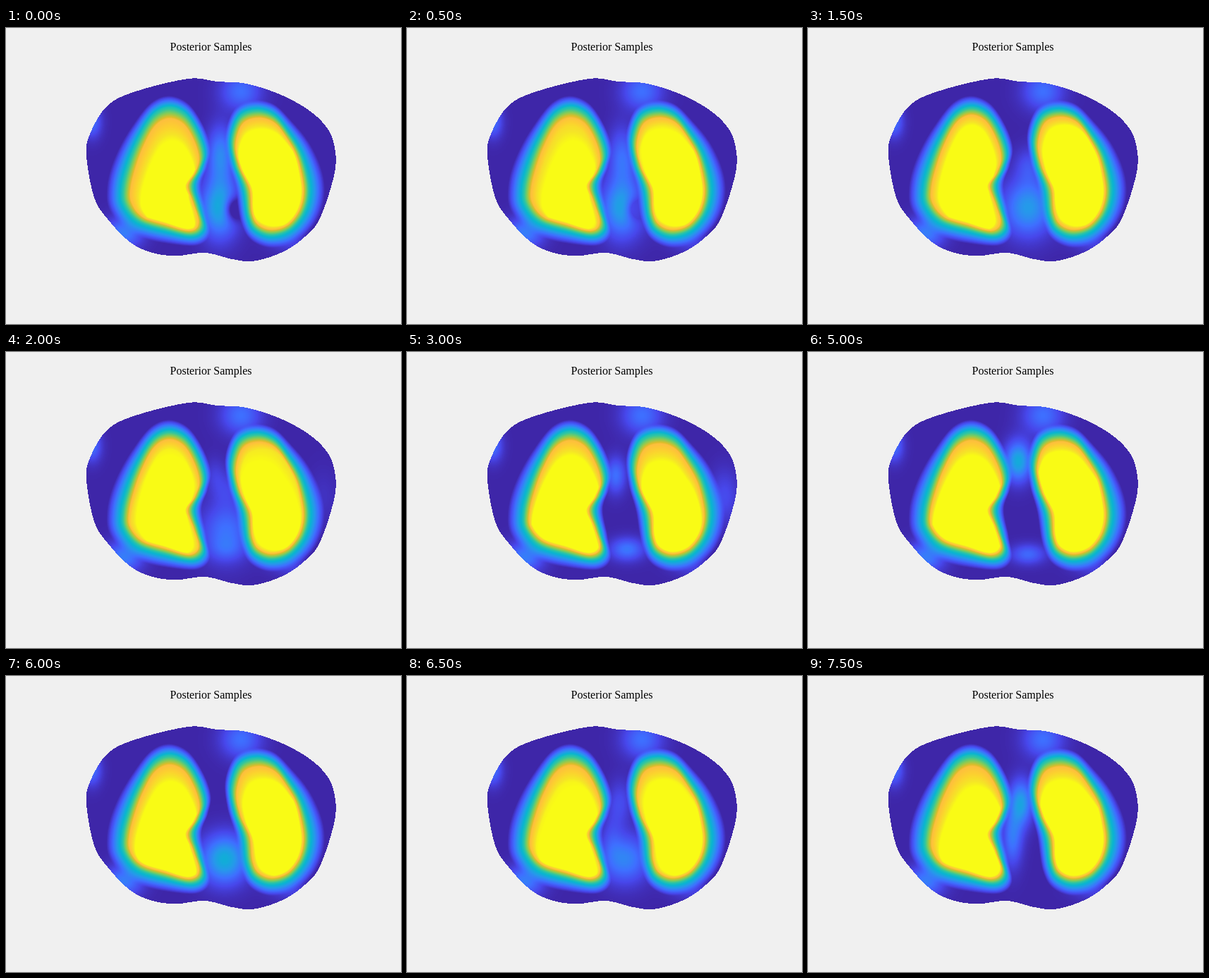
Write an HTML page with a canvas that moves like this. It is 560 px wide and 420 px high and loops after 8000 ms.

```html
<!DOCTYPE html>
<html lang="en">
<head>
<meta charset="utf-8">
<title>Posterior Samples</title>
<style>
  html, body { margin: 0; width: 100%; height: 100%; overflow: hidden; background: #f0f0f0; }
  canvas { position: absolute; left: 0; top: 0; }
  div { position: absolute; left: 21px; right: 0; top: 18px; text-align: center;
        font: 16px/18px "Liberation Serif", serif; color: #000; white-space: nowrap; }
</style>
</head>
<body>
<canvas id="stage" width="560" height="420"></canvas>
<div>Posterior Samples</div>
<script>
const LOOP = 8000, STEP = 500, BINS = 720;
const BOX = { x: 110, y: 68, w: 360, h: 268 };
const ctx = document.getElementById('stage').getContext('2d');
const clamp = (v, lo, hi) => Math.max(lo, Math.min(hi, v));
const mix = (a, b, t) => a + (b - a) * t;

// Colour scale: position, red, green, blue.
const stops = [
  [0, 62, 38, 168], [0.11, 71, 71, 235], [0.22, 62, 111, 255], [0.33, 39, 151, 235],
  [0.44, 8, 181, 208], [0.56, 49, 198, 159], [0.67, 129, 204, 89], [0.78, 220, 189, 41],
  [0.83, 253, 190, 61], [0.89, 252, 207, 48], [0.95, 245, 228, 39], [1, 249, 251, 21]
];

function colour(v) {
  const i = Math.max(1, stops.findIndex(s => s[0] >= v));
  const [a, b] = [stops[i - 1], stops[i]];
  const t = (v - a[0]) / (b[0] - a[0]);
  return [1, 2, 3].map(k => mix(a[k], b[k], t));
}
const shades = Array.from({ length: 257 }, (_, i) => colour(i / 256));

const binOf = (dx, dy) => (Math.atan2(dy, dx) / (2 * Math.PI) + 1) % 1 * BINS;

// Smooth closed curve through points, stored as radius per angle around a centre.
function polar([cx, cy], pts) {
  const n = pts.length, table = new Float32Array(BINS + 1);
  const spline = (i, t, k) => {
    const [a, b, c, d] = [-1, 0, 1, 2].map(o => pts[(i + o + n) % n][k]);
    return b + t / 2 * (c - a + t * (2 * a - 5 * b + 4 * c - d + t * (3 * (b - c) + d - a)));
  };
  for (let i = 0; i < n; i++) {
    for (let t = 0; t < 1; t += 0.005) {
      const dx = spline(i, t, 0) - cx, dy = spline(i, t, 1) - cy;
      table[Math.round(binOf(dx, dy)) % BINS] = Math.hypot(dx, dy);
    }
  }
  for (let i = 1; i < BINS; i++) table[i] = table[i] || table[i - 1];
  table[BINS] = table[0];
  return table;
}

function radius(table, bin) {
  const i = Math.floor(bin) % BINS;
  return mix(table[i], table[i + 1], bin - Math.floor(bin));
}

const middle = [290, 200];
const chest = polar(middle, [
  [258, 72], [300, 76], [340, 79], [385, 93], [425, 114], [452, 138], [465, 165], [466, 205],
  [445, 270], [422, 298], [390, 319], [350, 331], [320, 328], [282, 319], [240, 323],
  [205, 318], [175, 303], [145, 272], [125, 240], [114, 180], [120, 148], [143, 111], [180, 91]
]);

function organ(centre, side, rim) {
  const xs = rim.map(p => p[0]), ys = rim.map(p => p[1]);
  const x0 = Math.min(...xs), y0 = Math.min(...ys);
  const w = Math.max(...xs) - x0, h = Math.max(...ys) - y0;
  const fit = ([l, t, r, b]) =>
    rim.map(([x, y]) => [l + (x - x0) / w * (r - l), t + (y - y0) / h * (b - t)]);
  return { centre, side, edge: polar(centre, rim), core: box => polar(centre, fit(box)) };
}

const left = organ([228, 225], -1, [
  [230, 112], [207, 124], [187, 157], [173, 192], [165, 225], [167, 251], [188, 275], [228, 288],
  [264, 295], [280, 283], [274, 255], [266, 224], [276, 200], [281, 177], [272, 148], [254, 121]
]);
const right = organ([383, 225], 1, [
  [354, 116], [330, 126], [319, 158], [324, 193], [337, 228], [343, 267], [354, 287],
  [377, 295], [404, 286], [424, 260], [430, 225], [419, 180], [399, 146], [379, 123]
]);

// Saturated core, orange shoulder, teal edge, then a fade to nothing.
function level({ centre, side, edge }, core, x, y) {
  const dx = x - centre[0], dy = y - centre[1], r = Math.hypot(dx, dy);
  const bin = binOf(dx, dy), rim = radius(edge, bin);
  const full = Math.min(radius(core, bin), rim - 12);
  const shoulder = rim - 6 - 0.22 * (rim - full);
  const fade = 17 + (5 * side * dx + dy) / r;
  if (r <= full) return 1;
  if (r <= shoulder) return mix(1, 0.83, (r - full) / (shoulder - full));
  if (r <= rim) return mix(0.83, 0.5, (r - shoulder) / (rim - shoulder));
  return Math.max(0, 0.5 * (1 - (r - rim) / fade));
}

// Soft spots: x, y, x radius, y radius, strength.
const common = [
  [168, 290, 26, 22, 0.26], [122, 133, 13, 22, 0.22], [402, 304, 28, 13, 0.1], [333, 90, 28, 26, 0.22]
];

// Cores are boxes (left, top, right, bottom) that the lung outline is fitted into.
const samples = [
  { slot: 0, left: [192, 160, 268, 287], right: [330, 144, 427, 281],
    spots: [[304, 180, 18, 40, 0.28], [303, 255, 26, 42, 0.4], [323, 257, 13, 16, -0.33]] },
  { slot: 3, left: [186, 138, 266, 285], right: [333, 138, 426, 281],
    spots: [[312, 255, 34, 40, 0.34], [312, 195, 18, 25, 0.12]] },
  { slot: 6, left: [178, 147, 272, 290], right: [333, 155, 417, 286],
    spots: [[296, 175, 14, 25, 0.22], [312, 280, 24, 16, 0.24], [450, 205, 20, 38, 0.12]] },
  { slot: 8, left: [206, 160, 268, 290], right: [356, 165, 419, 282],
    spots: [[305, 118, 30, 28, 0.22], [305, 255, 32, 40, 0.26]] },
  { slot: 10, left: [178, 147, 273, 291], right: [327, 141, 424, 284],
    spots: [[298, 155, 18, 28, 0.4], [312, 287, 24, 14, 0.2]] },
  { slot: 12, left: [184, 150, 270, 288], right: [336, 147, 427, 283],
    spots: [[310, 260, 32, 34, 0.41]] },
  { slot: 15, left: [187, 157, 277, 290], right: [330, 148, 425, 284],
    spots: [[302, 180, 16, 32, 0.35], [290, 230, 14, 40, 0.24]] }
];

for (const s of samples) {
  const spots = common.concat(s.spots);
  const leftCore = left.core(s.left), rightCore = right.core(s.right);
  s.field = new Float32Array(BOX.w * BOX.h).map((_, i) => {
    const x = BOX.x + i % BOX.w + 0.5, y = BOX.y + Math.floor(i / BOX.w) + 0.5;
    const dx = x - middle[0], dy = y - middle[1];
    if (Math.hypot(dx, dy) > radius(chest, binOf(dx, dy))) return -1;
    const haze = spots.reduce((sum, [sx, sy, rx, ry, k]) =>
      sum + k * Math.exp(-(((x - sx) / rx) ** 2) - ((y - sy) / ry) ** 2), 0);
    return Math.min(1, Math.hypot(
      level(left, leftCore, x, y), level(right, rightCore, x, y), clamp(haze, 0, 0.45)));
  });
}

// Slots between two samples show a blend of both.
function draw(slot) {
  const next = samples.find(s => s.slot >= slot);
  const prev = samples.filter(s => s.slot <= slot).pop();
  const t = next === prev ? 0 : (slot - prev.slot) / (next.slot - prev.slot);
  const image = ctx.createImageData(BOX.w, BOX.h);
  prev.field.forEach((v, i) => {
    if (v < 0) return;
    image.data.set(shades[Math.round(mix(v, next.field[i], t) * 256)], i * 4);
    image.data[i * 4 + 3] = 255;
  });
  ctx.putImageData(image, BOX.x, BOX.y);
}

let shown = -1;
function tick(now) {
  const slot = Math.floor(now % LOOP / STEP);
  if (slot !== shown) draw(shown = slot);
  requestAnimationFrame(tick);
}
tick(0);
</script>
</body>
</html>
```
